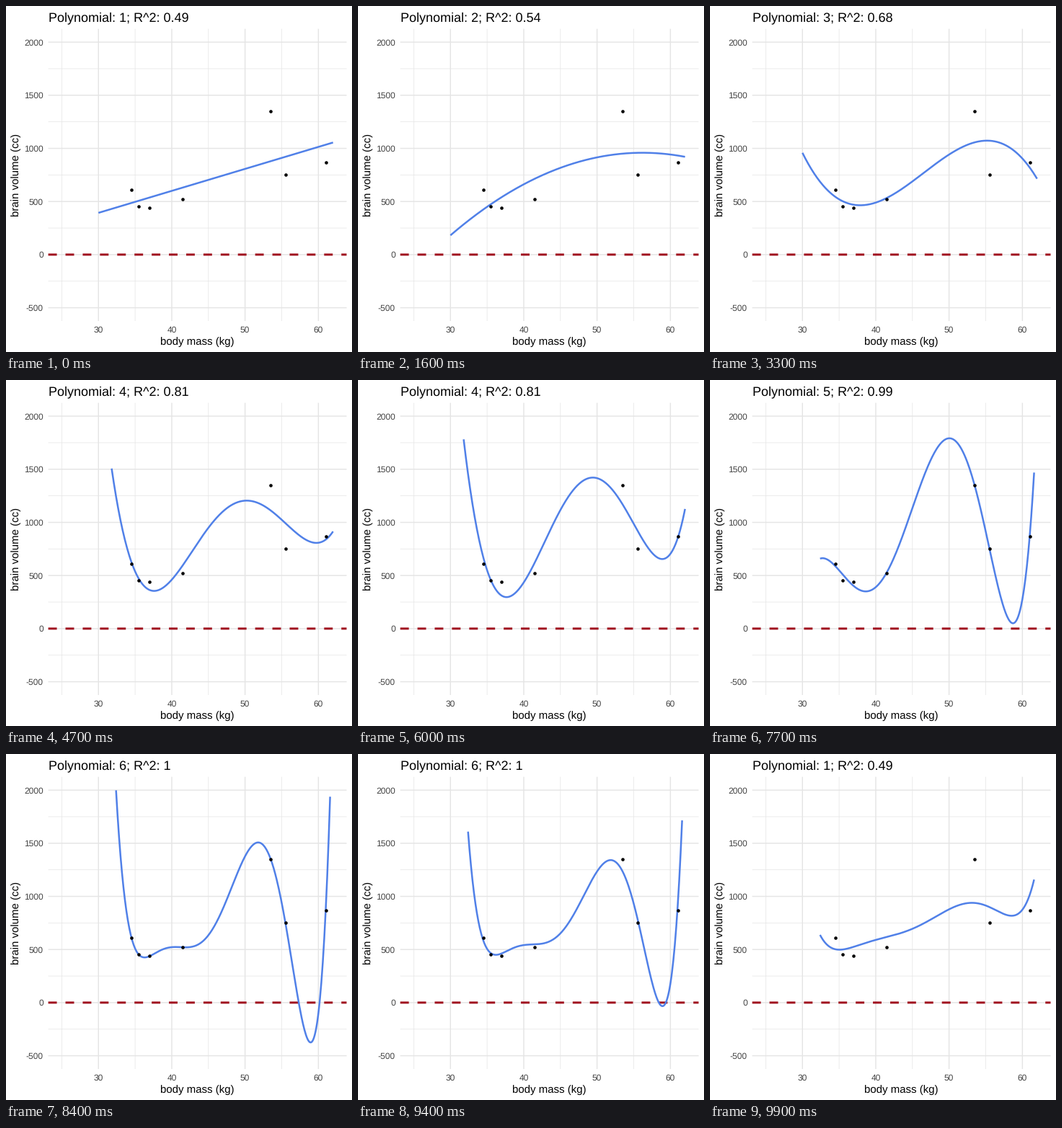
A matplotlib script that plays this animation: 480 by 480 pixels, repeating every 10 s.

```python
import matplotlib.pyplot as plt
import numpy as np
from matplotlib.animation import FuncAnimation

SIZE, DPI = 480, 72
FRAMES, INTERVAL = 100, 100
LEFT, RIGHT, TOP, BOTTOM = 58.6, 472.5, 31.7, 437.0
X_RANGE, Y_RANGE = (23.15, 63.85), (-625, 2125)
Y_LIMITS = (-500, 2000)
GRID, BLUE, RED, TICK = "#e5e5e5", "#5080e8", "#a0121f", "#444444"

# First and last frame of each morph between neighbouring degrees
MORPHS = [(8, 16), (25, 33), (42, 50), (59, 68), (76, 84), (92, 100)]

plt.rcParams["font.family"] = "Liberation Sans"
plt.rcParams["text.hinting"] = "none"

mass = np.array([37.0, 35.5, 34.5, 41.5, 55.5, 61.0, 53.5])
brain = np.array([438, 452, 612, 521, 752, 871, 1350])
grid_x = np.linspace(30, 62, 321)


def px(x):
    return LEFT + (x - X_RANGE[0]) / (X_RANGE[1] - X_RANGE[0]) * (RIGHT - LEFT)


def py(y):
    return BOTTOM - (y - Y_RANGE[0]) / (Y_RANGE[1] - Y_RANGE[0]) * (BOTTOM - TOP)


def fit(degree):
    """Fitted curve, with values outside the limits dropped, and its title."""
    def scaled(x):
        return (x - 47) / 15

    coeffs = np.polyfit(scaled(mass), brain, degree)
    residual = brain - np.polyval(coeffs, scaled(mass))
    r2 = 1 - residual.var() / brain.var()
    curve = np.polyval(coeffs, scaled(grid_x))
    inside = (curve >= Y_LIMITS[0]) & (curve <= Y_LIMITS[1])
    title = f"Polynomial: {degree}; R^2: {round(r2, 2):g}"
    return np.where(inside, curve, np.nan), title


fits = [fit(degree) for degree in range(1, 7)]

fig = plt.figure(figsize=(SIZE / DPI, SIZE / DPI), dpi=DPI, facecolor="white")
ax = fig.add_axes([0, 0, 1, 1])
ax.set_xlim(0, SIZE)
ax.set_ylim(SIZE, 0)
ax.axis("off")


def rule(xs, ys, **style):
    ax.plot(xs, ys, solid_capstyle="butt", dash_capstyle="butt", snap=False, **style)


def label(x, y, text, size, color="black", ha="center", rotation=0):
    return ax.text(x, y, text, fontsize=size, color=color, ha=ha, va="baseline",
                   rotation=rotation, rotation_mode="anchor")


def grid_lines(xs, ys, width):
    for y in ys:
        rule([LEFT, RIGHT], [py(y)] * 2, color=GRID, lw=width, zorder=1)
    for x in xs:
        rule([px(x)] * 2, [TOP, BOTTOM], color=GRID, lw=width, zorder=1)


major_x, major_y = range(30, 61, 10), range(-500, 2001, 500)
grid_lines(range(25, 56, 10), range(-250, 1751, 500), 0.73)
grid_lines(major_x, major_y, 1.46)

for x in major_x:
    label(px(x), 452.6, str(x), 12, TICK)
for y in major_y:
    label(51.9, py(y) + 4.3, str(y), 12, TICK, ha="right")
label((LEFT + RIGHT) / 2, 469.8, "body mass (kg)", 15)
label(18.3, (TOP + BOTTOM) / 2, "brain volume (cc)", 15, rotation=90)
title = label(LEFT, 20.8, "", 18, ha="left")

rule([LEFT, RIGHT], [py(0)] * 2, color=RED, lw=2.99, ls=(0, (4, 4)), zorder=2)
line, = ax.plot([], [], color=BLUE, lw=2.5, solid_capstyle="butt",
                solid_joinstyle="round", zorder=3)
ax.plot(px(mass), py(brain), "o", color="black", ms=4.6, mew=0, zorder=4)


def state(frame):
    for i, (start, end) in enumerate(MORPHS):
        if frame <= start:
            return fits[i]
        if frame < end:
            t = (frame - start) / (end - start)
            old, new = fits[i], fits[(i + 1) % len(fits)]
            return (1 - t) * old[0] + t * new[0], (new if t >= 0.5 else old)[1]


def update(frame):
    curve, text = state(frame)
    line.set_data(px(grid_x), py(curve))
    title.set_text(text)
    return line, title


anim = FuncAnimation(fig, update, frames=FRAMES, interval=INTERVAL,
                     repeat=True, repeat_delay=0)
plt.show()
```
